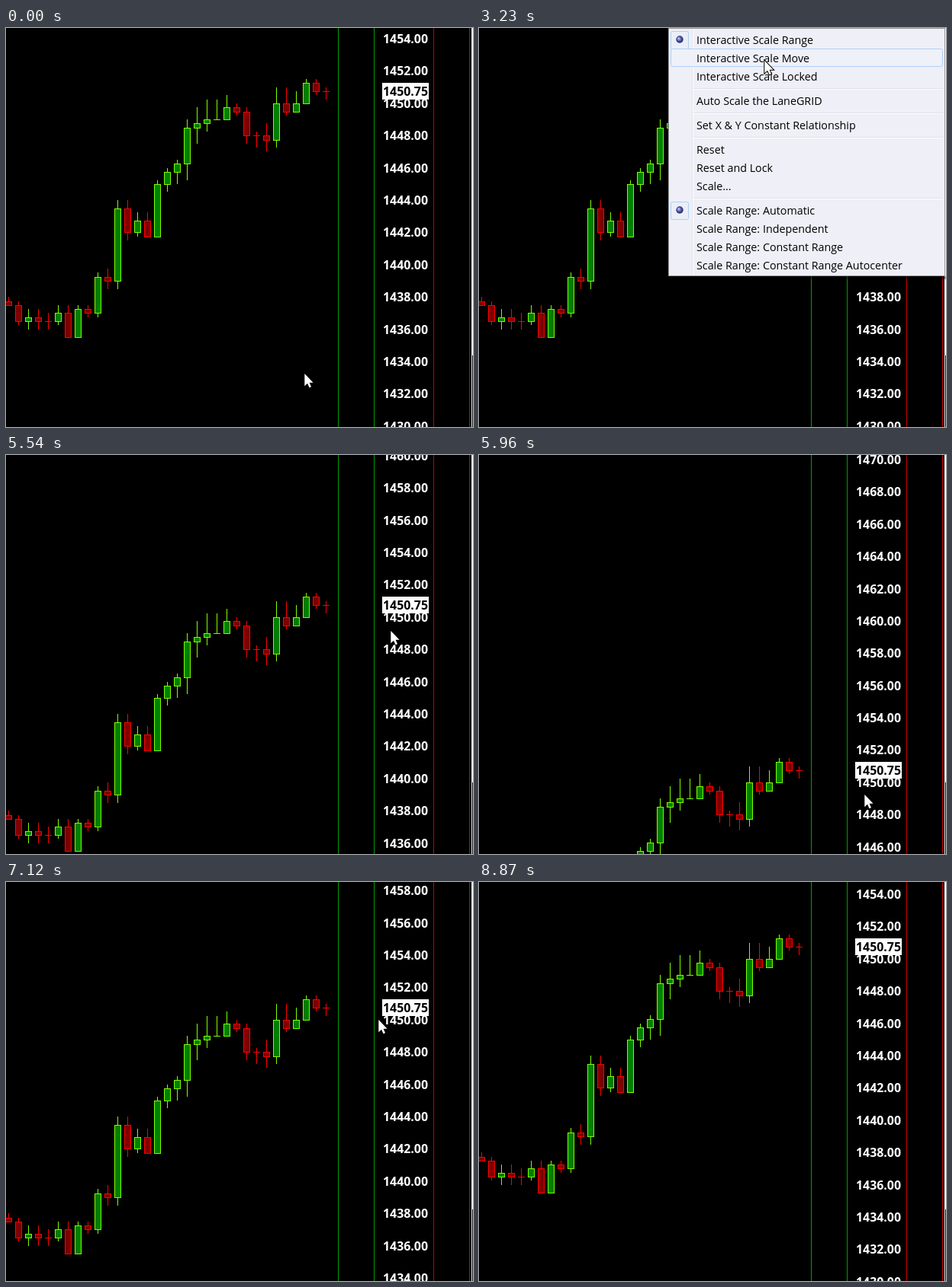
An HTML page with a canvas that plays this animation: 612 px wide and 524 px high, repeating every 10 s.

```html
<!DOCTYPE html>
<html lang="en">
<head>
<meta charset="utf-8">
<title>Price scale drag</title>
<style>
html, body { margin: 0; width: 100%; height: 100%; overflow: hidden; background: #000; }
canvas { display: block; }
</style>
</head>
<body>
<canvas id="stage" width="612" height="524"></canvas>
<script>
const ctx = document.getElementById('stage').getContext('2d');
const LOOP = 10000, STEP = 60, LAG = 26;
const TICK = 5.298;          // pixels per quarter point
const BASE = 1450, BASE_Y = 99.42;
const GRAB_Y = 108, GRAB = 5000, DROP = 8180;
const LABEL_FONT = 'bold 15.9px "Open Sans", "Noto Sans", sans-serif';
const MENU_FONT = '14.3px "Open Sans", "Noto Sans", sans-serif';

// pointer moves: waypoints are evenly spaced between from and to
const moves = [
  { from: 0, to: 780, path: [[391, 454], [547, 165]] },
  { from: 1300, to: 2080, path: [[547, 165], [374, 43]] },
  { from: 4140, to: 4800, path: [[374, 43], [547, 92], [507, 108]] },
  { from: GRAB, to: 6020, path: [[507, 108], [504, 221], [505, 453]] },
  { from: 6340, to: 7360, path: [[505, 453], [505, 415], [500, 300], [487, 186], [547, 124]] },
  { from: 7360, to: 7720, path: [[547, 124], [532, 114]] },
  { from: 8060, to: DROP, path: [[532, 114], [532, 110]] },
  { from: 8450, to: 8870, path: [[532, 110], [498, 540]] }
];

// closing prices in quarter points from BASE; each candle opens at the last close
const closes = [
  -50, -54, -53, -54, -54, -52, -58, -51, -52, -43, -44, -26, -32, -29, -33, -20, -17,
  -15, -6, -5, -4, -4, -1, -2, -8, -8, -9, 0, -2, 0, 5, 3, 3
];
const bump = (i, mid, width) => Math.exp(-(((i - mid) / width) ** 2));
const wave = (i, peak, period) => 1 + Math.cos(2 * Math.PI * (i - peak) / period);

const candles = [];
closes.forEach((close, i) => {
  const last = candles[i - 1];
  const open = last ? last.close : -49;
  const up = close === open ? last.up : close > open;
  const above = Math.round(0.7 + wave(i, 20, 8) * (0.8 + 1.8 * bump(i, 23, 5)));
  const below = Math.round(wave(i, 18, 7.5) * (1 + 1.3 * bump(i, 20, 6)));
  candles.push({
    open, close, up,
    high: Math.min(6, Math.max(open, close) + above),
    low: Math.max(-58, Math.min(open, close) - below)
  });
});

// an empty label is a separator
const labels = [
  'Interactive Scale Range', 'Interactive Scale Move', 'Interactive Scale Locked', '',
  'Auto Scale the LaneGRID', '', 'Set X & Y Constant Relationship', '',
  'Reset', 'Reset and Lock', 'Scale...', '',
  'Scale Range: Automatic', 'Scale Range: Independent',
  'Scale Range: Constant Range', 'Scale Range: Constant Range Autocenter'
];
const items = [], rules = [];
let row = 16;
for (const label of labels) {
  if (label) {
    items.push({ label, y: row });
    row += 24;
  } else {
    rules.push(row - 8);
    row += 8;
  }
}

// curve through the values that never overshoots and rests at turning points
function curve(v, u) {
  const i = Math.min(Math.floor(u), v.length - 2);
  const tangent = k => {
    if (k === 0 || k === v.length - 1) return 0;
    const a = v[k] - v[k - 1], b = v[k + 1] - v[k];
    return a * b > 0 ? 2 * a * b / (a + b) : 0;
  };
  const f = u - i, g = 1 - f;
  return g * g * (1 + 2 * f) * v[i] + f * f * (3 - 2 * f) * v[i + 1] +
    f * g * (g * tangent(i) - f * tangent(i + 1));
}

const moveAt = t => moves.filter(m => m.from <= t).pop();

function pointerAt(t) {
  const { from, to, path } = moveAt(t);
  const u = Math.min(1, (t - from) / (to - from)) * (path.length - 1);
  return [0, 1].map(c => Math.round(curve(path.map(p => p[c]), u)));
}

// the chart follows the held pointer slightly late
function offsetAt(t) {
  const held = Math.min(DROP, Math.max(GRAB, t - LAG));
  return pointerAt(held)[1] - GRAB_Y;
}

function snap(t) {
  const { from } = moveAt(t);
  return from + Math.floor((t - from) / STEP) * STEP;
}

function rect(x, y, w, h, color) {
  ctx.fillStyle = color;
  ctx.fillRect(x, y, w, h);
}

function text(str, x, y, font, color) {
  ctx.font = font;
  ctx.fillStyle = color;
  ctx.fillText(str, x, y);
}

function drawCandles(off) {
  const yOf = n => Math.floor(BASE_Y - n * TICK) + off;
  candles.forEach(({ open, close, high, low, up }, i) => {
    const x = 3 + i * 13;
    const line = up ? '#7fff00' : '#ff0000';
    const top = yOf(Math.max(open, close)), bottom = yOf(Math.min(open, close));
    rect(x, yOf(high), 1, yOf(low) - yOf(high), line);
    rect(x - 4, top, 9, bottom - top + 1, line);
    if (bottom > top) rect(x - 3, top + 1, 7, bottom - top - 1, up ? '#008000' : '#800000');
  });
}

function drawScale(off) {
  for (let p = 1420; p <= 1480; p += 2) {
    const y = Math.round(BASE_Y + (BASE - p) * 4 * TICK + off + 5.4);
    text(p.toFixed(2), 494, y, LABEL_FONT, '#fff');
  }
  rect(493, 72 + off, 61, 22, '#fff');
  text('1450.75', 494, 89 + off, LABEL_FONT, '#000');
}

function drawLines() {
  rect(435, 0, 1, 524, '#00a000');
  rect(482, 0, 1, 524, '#00a000');
  rect(560, 0, 1, 524, '#c80000');
  rect(607, 0, 1, 524, '#c80000');
  rect(610, 0, 1, 524, '#fff');
  rect(611, 0, 1, 430, '#fff');
}

function panel(x, y, w, h, fill) {
  ctx.beginPath();
  ctx.roundRect(x + 0.5, y + 0.5, w - 1, h - 1, 2);
  ctx.fillStyle = fill;
  ctx.fill();
  ctx.strokeStyle = '#aecff7';
  ctx.lineWidth = 1;
  ctx.stroke();
}

function drawItem({ label, y }, hot) {
  if (hot) panel(251, y - 13, 357, 24, '#eff1f8');
  text(label, 285, y + 5, MENU_FONT, '#000');
}

function drawRadio(y) {
  panel(251, y - 12, 24, 24, '#eaeff8');
  const g = ctx.createRadialGradient(261.5, y - 2.5, 0.5, 263, y - 1, 5);
  g.addColorStop(0, '#c4c8f0');
  g.addColorStop(0.5, '#5558a8');
  g.addColorStop(1, '#1c1c58');
  ctx.fillStyle = g;
  ctx.beginPath();
  ctx.arc(263, y - 1, 4.7, 0, 7);
  ctx.fill();
}

function drawMenu(hot) {
  rect(252, 326, 360, 4, 'rgba(0,0,0,.4)');
  rect(248, 0, 363, 326, '#979797');
  rect(249, 1, 361, 324, '#efeff7');
  rect(279, 2, 1, 322, '#e2e3ea');
  rect(280, 2, 1, 322, '#fff');
  for (const y of rules) {
    rect(281, y - 1, 327, 1, '#dfe0e6');
    rect(281, y, 327, 1, '#fff');
  }
  drawRadio(16);
  drawRadio(240);
  for (const item of items) drawItem(item, item === hot);
}

function drawPopup(t, py) {
  if (t < 1040 || t >= 3470) return;
  const hot = t < 1360 ? null : items.find(({ y }) => Math.abs(py - y) <= 12);
  if (t < 3290) {
    ctx.globalAlpha = t < 1100 ? 0.5 : 1;
    drawMenu(hot);
  } else {
    // only the chosen entry lingers
    ctx.globalAlpha = 0.75 - 0.25 * Math.floor((t - 3290) / STEP);
    rect(251, 27, 357, 24, '#efeff7');
    drawItem(items[1], true);
  }
  ctx.globalAlpha = 1;
}

const arrow = new Path2D('M.3 0V16.2L4 12.8 6.5 18.3 9 17.2 6.6 11.8H11.6Z');

function drawPointer(x, y) {
  ctx.save();
  ctx.translate(x, y);
  ctx.strokeStyle = '#000';
  ctx.lineWidth = 2;
  ctx.stroke(arrow);
  ctx.fillStyle = '#fff';
  ctx.fill(arrow);
  ctx.restore();
}

function draw(t) {
  const q = snap(t);
  const [x, y] = pointerAt(q), off = offsetAt(q);
  rect(0, 0, 612, 524, '#000');
  drawLines();
  drawCandles(off);
  drawScale(off);
  drawPopup(t, y);
  drawPointer(x, y);
}

const begin = performance.now();
function loop() {
  draw((performance.now() - begin) % LOOP);
  requestAnimationFrame(loop);
}
loop();
</script>
</body>
</html>
```
